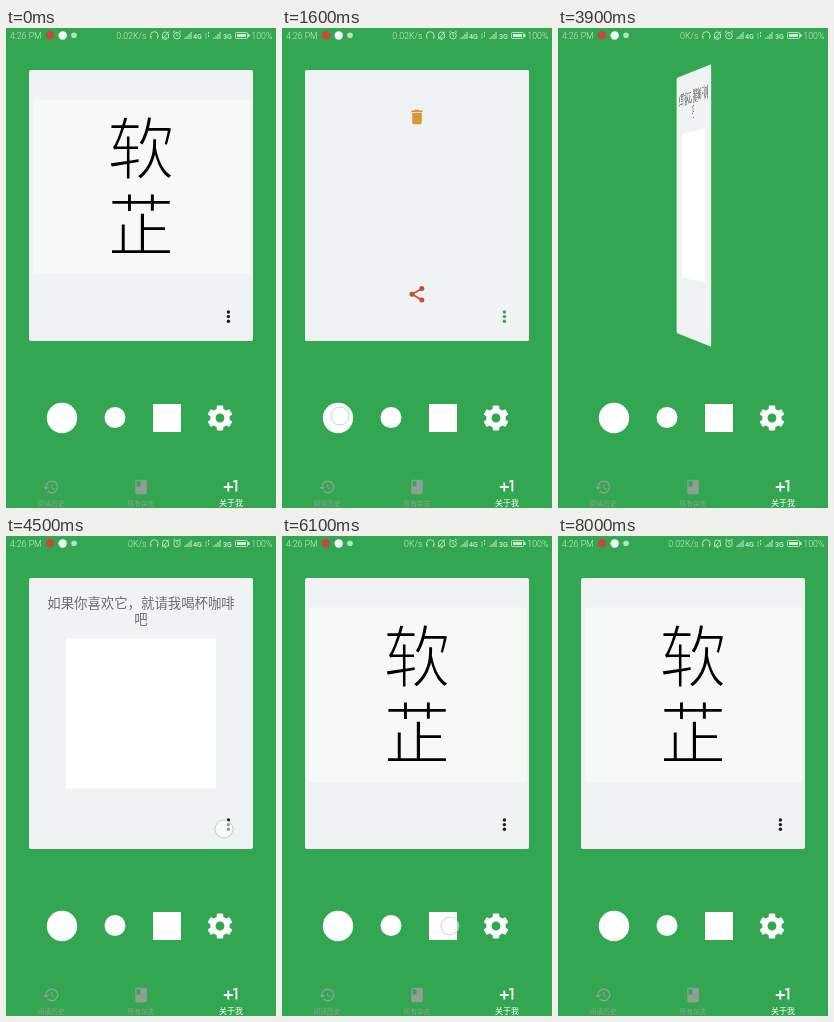
Write an HTML page that moves like this. It is 270 px wide and 480 px high and loops after 8.2 s.

```html
<!DOCTYPE html>
<html lang="zh-CN">
<head>
<meta charset="utf-8">
<title>Flip card</title>
<style>
  html, body { margin: 0; width: 100%; height: 100%; overflow: hidden; background: #33a651; }
  #stage { position: relative; width: 270px; height: 480px; overflow: hidden; }
  svg { display: block; position: absolute; left: 0; top: 0; }
  #card { position: absolute; left: 23px; top: 42px; width: 224px; height: 271px; }
  text { font-family: Roboto, "Noto Sans CJK SC", "Noto Sans CJK", sans-serif; }
  .status { font-size: 8.8px; font-weight: 300; fill: #cdebd4; }
  .net { font-size: 7.2px; font-weight: 500; }
  .tab { font-size: 6.8px; font-weight: 300; fill: #8f9f93; text-anchor: middle; }
  .tab.on { font-size: 8px; fill: #fff; }
  .hint { font-size: 13.4px; fill: #6a6e6e; text-anchor: middle; font-weight: 300; }
  /* the outline in the paper colour slims the strokes */
  .big { font: 400 68px "Noto Sans CJK SC", "Noto Sans CJK", sans-serif; text-anchor: middle;
         fill: #000; stroke: #f6faf6; stroke-width: 2.1px; }
  .line { fill: none; stroke: #cdebd4; stroke-width: .85; }
</style>
</head>
<body>
<div id="stage">
  <svg width="270" height="480">
    <defs>
      <g id="dots"><circle cx="222.4" cy="284" r="1.7"/><circle cx="222.4" cy="288.6" r="1.7"/><circle cx="222.4" cy="293.2" r="1.7"/></g>
      <path id="signal" d="M0 7V5.5M2 7V4M4 7V2M6 7V0" stroke="#cdebd4" fill="none"/>
      <rect id="tooth" x="-3.4" y="-13.2" width="6.8" height="6" rx="1"/>
    </defs>

    <!-- status bar -->
    <g class="status">
      <text x="4" y="11">4:26 PM</text>
      <circle cx="44" cy="7.3" r="4.2" fill="#c8483c"/>
      <circle cx="56.7" cy="7.5" r="4.2" fill="#f2faf4"/>
      <circle cx="68" cy="7.3" r="2.8" fill="#b9e2c3"/>
      <text id="speed" x="140.5" y="11" text-anchor="end"></text>
      <path class="line" d="M144.5 9V7.5a3.8 3.8 0 0 1 7.6 0V9M145 8v3M151.6 8v3"/>
      <path class="line" d="M156.5 10V7a3 3 0 0 1 6 0v3zM158.5 11.5h2M156 11.5l7-8"/>
      <g class="line"><circle cx="171" cy="7.7" r="3.3"/><path d="M171 5.5v2.4l1.5 1M167 4.5l2-1.7M175 4.5l-2-1.7"/></g>
      <use href="#signal" x="179" y="4"/>
      <text class="net" x="187" y="10.500">4G</text>
      <path class="line" d="M200 10.5V4.5M202.5 4v6" stroke-dasharray="2 1"/>
      <use href="#signal" x="208" y="4"/>
      <text class="net" x="217" y="10.500">3G</text>
      <rect class="line" x="229.5" y="4.5" width="12" height="6" rx="1"/>
      <path d="M231 6h9v3h-9zM242 6h1.500v3H242z"/>
      <text x="266.500" y="11" text-anchor="end">100%</text>
    </g>

    <!-- shortcuts -->
    <circle id="ripple" cy="390" r="15" fill="#126b2c"/>
    <g fill="#fff">
      <circle cx="56" cy="390" r="15.2"/>
      <circle cx="109" cy="389.5" r="10.5"/>
      <rect x="147" y="376" width="28" height="28"/>
      <g transform="translate(214 390) scale(.95)">
        <circle r="7.5" fill="none" stroke="#fff" stroke-width="5.6"/>
        <use href="#tooth"/><use href="#tooth" transform="rotate(60)"/><use href="#tooth" transform="rotate(120)"/>
        <use href="#tooth" transform="rotate(180)"/><use href="#tooth" transform="rotate(240)"/><use href="#tooth" transform="rotate(300)"/>
      </g>
    </g>

    <!-- tabs -->
    <g fill="#8f9f93">
      <path transform="translate(36.5 450.4) scale(.72)" d="M13 3c-4.97 0-9 4.03-9 9H1l4 4 4-4H6c0-3.87 3.13-7 7-7s7 3.13 7 7-3.13 7-7 7c-1.93 0-3.68-.79-4.94-2.06l-1.42 1.42C8.27 20 10.51 21 13 21c4.97 0 9-4.03 9-9s-4.03-9-9-9zm-1 5v5l4.28 2.54.72-1.21-3.5-2.08V8z"/>
      <path transform="translate(126.4 450.4) scale(.72)" d="M18 2H6a2 2 0 0 0-2 2v16a2 2 0 0 0 2 2h12a2 2 0 0 0 2-2V4a2 2 0 0 0-2-2zM6 4h5v8l-2.5-1.5L6 12z"/>
      <path transform="translate(214.2 447.3) scale(.9)" fill="#fff" d="M10 8H8v4H4v2h4v4h2v-4h4v-2h-4zM14.5 6.08V7.9l2.5-.5V18h2V5z"/>
    </g>
    <text class="tab" x="45" y="477.500">阅读历史</text>
    <text class="tab" x="135" y="477.500">所有杂志</text>
    <text class="tab on" x="225" y="477.500">关于我</text>
  </svg>

  <div id="card">
    <svg width="224" height="271" viewBox="23 42 224 271">
      <rect x="23" y="42" width="224" height="271" rx="2" fill="#eff3f4"/>
      <g id="picture">
        <rect x="27" y="71.5" width="217.5" height="174.5" fill="#f6faf6"/>
        <text class="big" x="135" y="145.500">软</text>
        <text class="big" x="135" y="223">芷</text>
      </g>
      <g id="blog">
        <text class="hint" x="135" y="72">点击我，进入不可思议的</text>
        <text class="hint" x="135" y="87.500">Velorid!</text>
        <circle cx="135" cy="177.5" r="30"/>
      </g>
      <g id="code">
        <text class="hint" x="135" y="72">点击我，看看我写的开源</text>
        <text class="hint" x="135" y="87.500">小作品！</text>
        <circle cx="135" cy="177.5" r="30"/>
      </g>
      <g id="pay">
        <text class="hint" x="135" y="72">如果你喜欢它，就请我喝杯咖啡</text>
        <text class="hint" x="135" y="87.500">吧</text>
        <rect x="60" y="102.5" width="150" height="150" fill="#fff"/>
      </g>
      <use href="#dots" fill="#1c1c1c"/>
      <g id="menu">
        <rect x="23" y="42" width="224" height="271" rx="2" fill="#eff3f4"/>
        <g id="pictureMenu">
          <path transform="translate(125.4 79.4) scale(.8)" fill="#dd9539" d="M6 19a2 2 0 0 0 2 2h8a2 2 0 0 0 2-2V7H6zM19 4h-3.5l-1-1h-5l-1 1H5v2h14z"/>
          <g fill="#c8502f">
            <path d="M139.8 260.8L130 266.3L139.8 272" fill="none" stroke="#c8502f" stroke-width="1.7"/>
            <circle cx="139.8" cy="260.6" r="2.5"/><circle cx="130" cy="266.3" r="2.5"/><circle cx="139.8" cy="272" r="2.5"/>
          </g>
        </g>
        <g id="payMenu">
          <path transform="translate(125.4 167.9) scale(.8)" fill="#c95a54" fill-rule="evenodd" d="M12 4.5C7 4.5 2.73 7.61 1 12c1.73 4.39 6 7.5 11 7.5s9.27-3.11 11-7.5c-1.73-4.39-6-7.5-11-7.5zM12 17a5 5 0 1 1 0-10a5 5 0 0 1 0 10zM12 9a3 3 0 1 0 0 6a3 3 0 0 0 0-6z"/>
        </g>
        <use href="#dots" fill="#33a651"/>
      </g>
    </svg>
  </div>

  <svg width="270" height="480">
    <circle id="touch" r="9" fill="#fff" fill-opacity=".55" stroke="#9fcdb0" stroke-opacity=".7" stroke-width="1"/>
  </svg>
</div>

<script>
const LOOP = 8200, FLIP = 600;
const $ = id => document.getElementById(id);
const iconX = { blog: 56, code: 109, pay: 161, picture: 214 };
// start time, face turned to
const flips = [
  [1800, 'blog'], [2780, 'code'], [3582, 'pay'],
  [5470, 'picture'], [6330, 'pay'], [7250, 'picture']
];
// from, to, x, y
const touches = [
  [880, 1010, 218, 293], [1540, 1740, 58, 388], [2590, 2720, 110, 390], [3380, 3510, 163, 390],
  [4460, 4590, 218, 293], [5130, 5260, 218, 294], [5320, 5430, 215, 391],
  [6060, 6260, 168, 390], [7060, 7190, 215, 391]
];

const ramp = (t, a, b) => Math.min(1, Math.max(0, (t - a) / (b - a)));
const ease = p => (1 - Math.cos(Math.PI * p)) / 2;
const show = (id, on) => { $(id).style.display = on ? '' : 'none'; };

function drawCard(t) {
  let face = 'picture', angle = 0;
  for (const [start, next] of flips) {
    if (t < start) break;
    angle = 180 * ease(ramp(t, start, start + FLIP));
    if (angle >= 90) {
      face = next;
      angle -= 180;
    }
  }
  const push = 1 - 0.011 * Math.abs(Math.sin(angle * Math.PI / 180));
  $('card').style.transform = angle ? `perspective(2150px) scale(${push}) rotateY(${angle}deg)` : 'none';
  for (const id in iconX) show(id, id === face);

  const first = t < 2400;
  const open = first
    ? (face === 'picture' ? ramp(t, 1000, 1250) : 0)
    : ramp(t, 4590, 4840) - ramp(t, 5260, 5460);
  $('menu').style.opacity = ease(open);
  show('pictureMenu', first);
  show('payMenu', !first);
}

function drawTouch(t) {
  const touch = touches.find(([a, b]) => t >= a && t < b + 80);
  show('touch', touch);
  if (touch) {
    const [, end, x, y] = touch;
    $('touch').setAttribute('cx', x);
    $('touch').setAttribute('cy', y);
    $('touch').style.opacity = 1 - ramp(t, end, end + 80);
  }
  const flip = flips.find(([start]) => t >= start - 80 && t < start + 280);
  show('ripple', flip);
  if (flip) {
    const [start, face] = flip;
    $('ripple').setAttribute('cx', iconX[face]);
    $('ripple').style.opacity = 0.4 * (ramp(t, start - 80, start) - ramp(t, start + 60, start + 280));
  }
}

const began = performance.now();
function frame() {
  const t = (performance.now() - began) % LOOP;
  $('speed').textContent = t < 2200 || t > 7000 ? '0.02K/s' : '0K/s';
  drawCard(t);
  drawTouch(t);
  requestAnimationFrame(frame);
}
frame();
</script>
</body>
</html>
```
